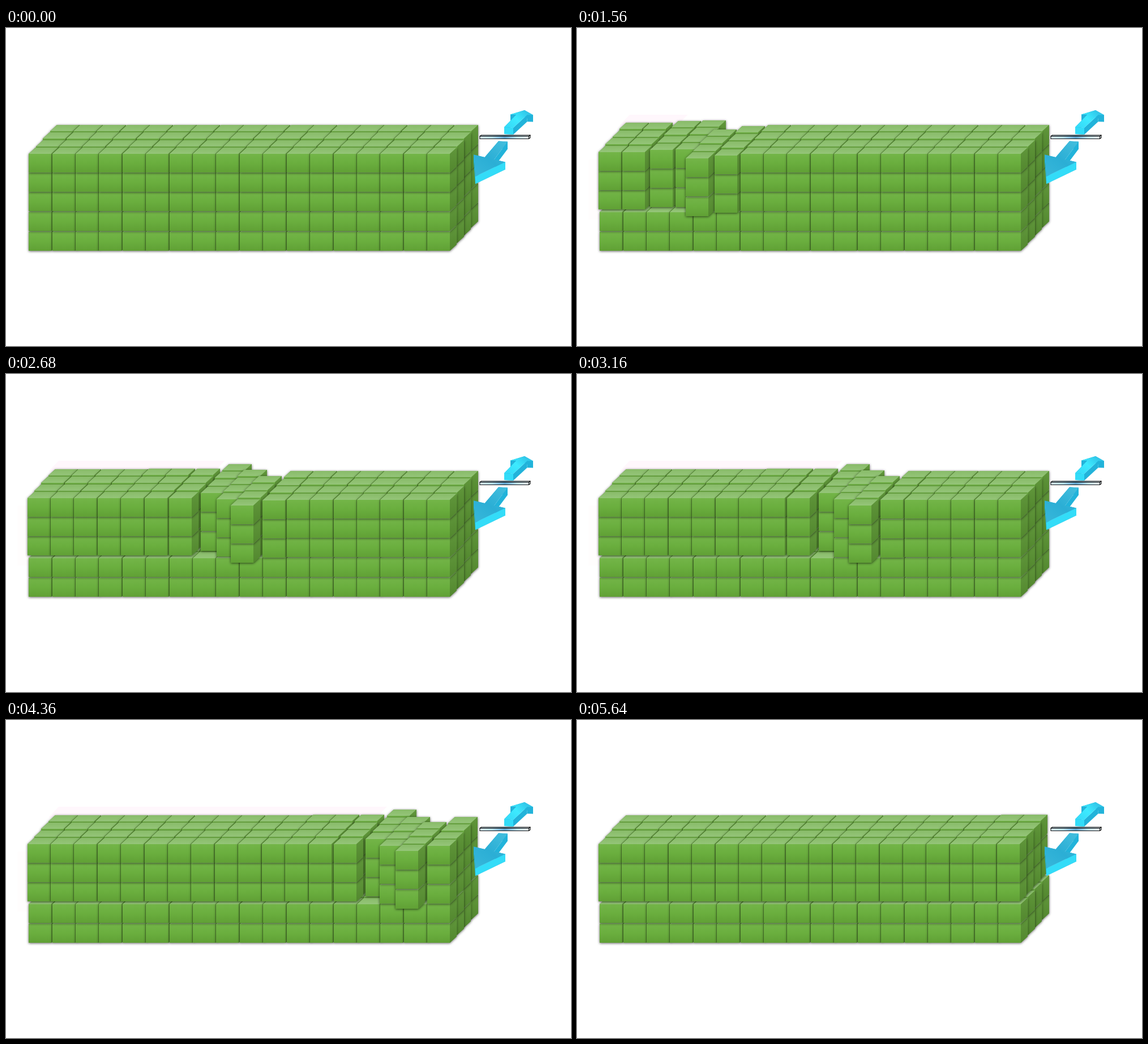
An HTML page with a canvas that plays this animation: 998 by 561 pixels, repeating every 5680 ms.

```html
<!DOCTYPE html>
<html lang="en">
<head>
<meta charset="utf-8">
<title>Slip through a block of cubes</title>
<style>
  html, body { margin: 0; width: 100%; height: 100%; overflow: hidden; background: #fff; }
  canvas { display: block; width: 998px; height: 561px; }
</style>
</head>
<body>
<canvas id="stage" width="998" height="561"></canvas>
<script>
const ctx = document.getElementById('stage').getContext('2d');
const LOOP = 5680, STEP = 40, COLUMN_DELAY = 243;
const COLUMNS = 18, LAYERS = 4, ROWS = 5, MOVING_ROWS = 3;
const LEFT = 40.1, TOP = 222, PITCH = 41.42, LAYER_X = 12.5, LAYER_Y = 13.5;
const FACE_W = 40, FACE_H = 33, DEPTH_X = 12, DEPTH_Y = 11;
const PAD = 8;

const bell = (t, center, width) => Math.exp(-((t - center) ** 2) / (2 * width * width));

function smoothstep(t, from, to) {
  const u = Math.min(1, Math.max(0, (t - from) / (to - from)));
  return u * u * (3 - 2 * u);
}

// A slab swings out to the front, then to the back, and settles slightly shifted
function slabOffset(time) {
  if (time <= 0) return [0, 0];
  const front = bell(time, 522, 112), back = bell(time, 932, 105);
  return [
    -16 * front + 15.6 * back - 2.6 * smoothstep(time, 1150, 1400),
    10 * front - 10 * back - 3 * smoothstep(time, 500, 1100)
  ];
}

// Rows grow slightly taller towards the bottom
const rowTop = row => TOP + 34 * row + 0.12 * row * row;

function shade(c, x0, y0, x1, y1, ...colors) {
  const g = c.createLinearGradient(x0, y0, x1, y1);
  colors.forEach((color, i) => g.addColorStop(i / (colors.length - 1), color));
  return g;
}

function polygon(c, fill, ...points) {
  c.beginPath();
  points.forEach(([x, y]) => c.lineTo(x, y));
  c.closePath();
  c.fillStyle = fill;
  c.fill();
}

const shift = ([x, y], [dx, dy], k = 1) => [x + dx * k, y + dy * k];

// Face swept from edge a-b along a vector
const sweep = (c, fill, a, b, along) => polygon(c, fill, a, b, shift(b, along), shift(a, along));

// One shaded cube; its origin is the top left corner of the front face
function makeCube() {
  const canvas = document.createElement('canvas');
  canvas.width = FACE_W + DEPTH_X + PAD * 2;
  canvas.height = FACE_H + DEPTH_Y + PAD * 2;
  const c = canvas.getContext('2d');
  c.translate(PAD, PAD + DEPTH_Y);
  const depth = [DEPTH_X, -DEPTH_Y];
  const a = [0, 0], b = [FACE_W, 0], d = [FACE_W, FACE_H], e = [0, FACE_H];
  c.shadowColor = 'rgba(0,0,0,.62)';
  c.shadowBlur = 4;
  c.shadowOffsetY = 1;
  polygon(c, '#5f9c38', a, shift(a, depth), shift(b, depth), shift(d, depth), d, e);
  c.shadowColor = 'transparent';
  sweep(c, shade(c, 0, -DEPTH_Y, 0, 0, '#88bb69', '#95c579'), a, b, depth);
  sweep(c, shade(c, 0, -DEPTH_Y, 0, FACE_H, '#60963b', '#52872e'), b, d, depth);
  polygon(c, shade(c, 0, 0, 0, FACE_H, '#73b548', '#6aae3e', '#60a035'), a, b, d, e);
  return canvas;
}

const cube = makeCube();

function drawSlab(column, firstRow, endRow, [dx, dy]) {
  for (let layer = LAYERS - 1; layer >= 0; layer--) {
    const x = LEFT + column * PITCH + layer * LAYER_X + dx;
    for (let row = endRow - 1; row >= firstRow; row--) {
      const y = rowTop(row) - layer * LAYER_Y + dy;
      ctx.drawImage(cube, Math.round(x) - PAD, Math.round(y) - PAD - DEPTH_Y);
    }
  }
}

// Faint tint left where the slabs have passed
function drawTrail(time) {
  if (time >= 5440) return;
  if (time > 520) {
    ctx.fillStyle = '#fffdfd';
    ctx.fillRect(20, 232, 20, 106);
  }
  const length = Math.min(740, PITCH * (time - 960) / COLUMN_DELAY);
  if (length > 10) sweep(ctx, '#fff7fc', [93, 153], [75, 172], [length, 0]);
}

function drawBar() {
  const a = [837, 191], b = [923.5, 191], down = [0, 4.5], back = [2.5, -2];
  const tint = shade(ctx, 837, 0, 925, 0, '#d9effb', '#b9e2f7', '#64a9d2', '#c4e7f8', '#edf8fd');
  ctx.strokeStyle = '#111';
  ctx.lineWidth = 1.1;
  ctx.lineJoin = 'round';
  for (const [p, q, along] of [[a, b, back], [b, shift(b, down), back], [a, b, down]]) {
    sweep(ctx, tint, p, q, along);
    ctx.stroke();
  }
}

// Block arrow: outline on the upper side, swept down; one side is lit
function drawArrow({ tail, neck, tip, wing, shaft, thickness, lit, top }) {
  const outline = [
    shift(tail, [8, 0.5]), shift(neck, wing, shaft), shift(neck, wing), tip,
    shift(neck, wing, -1), shift(neck, wing, -shaft), shift(tail, [-8, -0.5])
  ];
  const side = (i, fill) =>
    sweep(ctx, fill, outline[i], outline[(i + 1) % outline.length], [0, thickness]);
  outline.forEach((_, i) => side(i, '#22b3da'));
  polygon(ctx, shade(ctx, ...tail, ...tip, ...top), ...outline);
  side(lit, '#33dcf8');
}

function drawArrows() {
  drawArrow({
    tail: [888, 175.5], neck: [911, 153], tip: [916, 145], wing: [20, 0.5],
    shaft: 0.48, thickness: 12, lit: 6, top: ['#36dbf8', '#3deaff', '#31c7e9']
  });
  drawArrow({
    tail: [878, 200], neck: [854, 230], tip: [829, 262], wing: [28, 6.5],
    shaft: 0.3, thickness: 13, lit: 2, top: ['#42bddd', '#2baed5', '#37b7da']
  });
}

function draw(time) {
  ctx.fillStyle = '#fff';
  ctx.fillRect(0, 0, 998, 561);
  drawTrail(time);
  for (let i = 0; i < COLUMNS; i++) drawSlab(i, MOVING_ROWS, ROWS, [0, 0]);
  for (let i = 0; i < COLUMNS; i++) {
    drawSlab(i, 0, MOVING_ROWS, slabOffset(time - i * COLUMN_DELAY));
  }
  drawBar();
  drawArrows();
}

const start = performance.now();
function tick() {
  const time = (performance.now() - start) % LOOP;
  draw(Math.floor(time / STEP) * STEP);
  requestAnimationFrame(tick);
}
tick();
</script>
</body>
</html>
```
